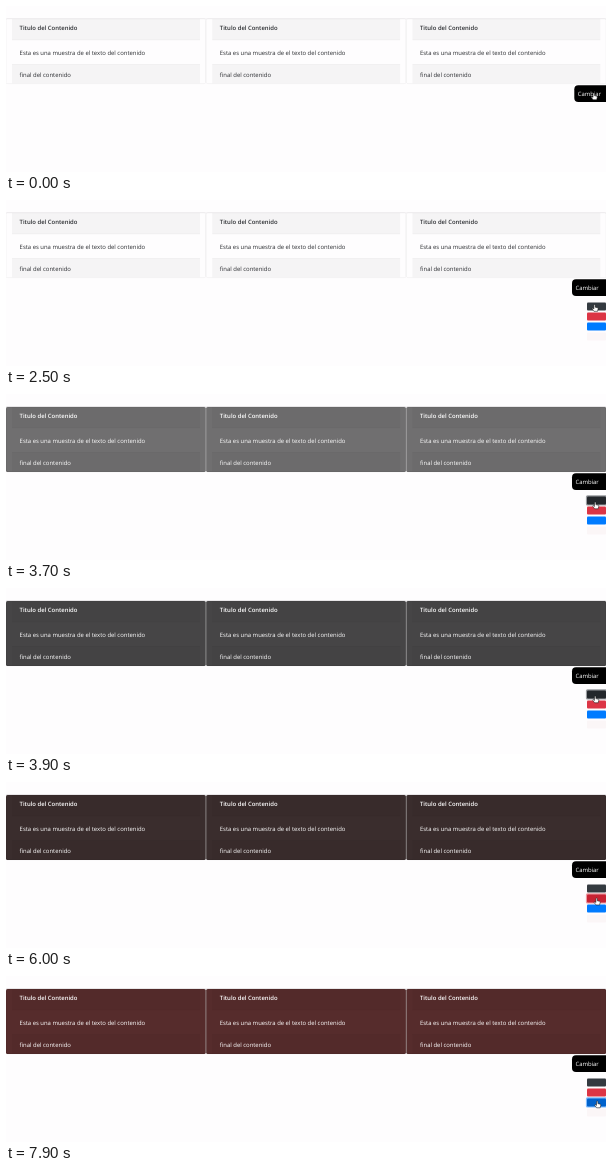
Recreate the animation shown at these times as an HTML page. Size 600x166 px, loop 8 s.

```html
<!DOCTYPE html>
<html lang="es">
<head>
<meta charset="utf-8">
<title>Cambiar</title>
<style>
  html, body { margin: 0; width: 100%; height: 100%; overflow: hidden; background: #fefdfe; }
  svg { display: block; width: 600px; height: 166px; }
  text { font: 5.93px "Open Sans", "Noto Sans", sans-serif; text-rendering: geometricPrecision; }
  .title { font-weight: 600; }
</style>
</head>
<body>
<svg id="stage" viewBox="0 0 600 166"></svg>
<script>
const LOOP = 8000;
const FADE = 1000;
const OPEN = 1350;
const stage = document.getElementById("stage");

function add(parent, tag, attrs, label) {
  const el = document.createElementNS("http://www.w3.org/2000/svg", tag);
  for (const key in attrs) el.setAttribute(key, attrs[key]);
  if (label) el.textContent = label;
  parent.appendChild(el);
  return el;
}

// The CSS "ease" curve, solved by bisection.
function ease(x) {
  if (x <= 0) return 0;
  if (x >= 1) return 1;
  const curve = (a, b, u) => 3 * a * u * (1 - u) ** 2 + 3 * b * u * u * (1 - u) + u ** 3;
  let lo = 0, hi = 1;
  for (let i = 0; i < 24; i++) {
    const mid = (lo + hi) / 2;
    if (curve(0.25, 0.25, mid) < x) lo = mid; else hi = mid;
  }
  return curve(0.1, 1, lo);
}

const mix = (a, b, k) => a.map((v, i) => v + (b[i] - v) * k);
const rgb = c => `rgb(${c.map(Math.round).join()})`;

// Cards
const cards = add(stage, "g", {});
const fills = [], edges = [];
add(cards, "rect", { x: 0, y: 12.5, width: 600, height: 0.7, fill: "#eeeaed" });
for (let i = 0; i < 3; i++) {
  const g = add(cards, "g", { transform: `translate(${i * 200.2})` });
  fills.push(add(g, "rect", { x: 0, y: 13, width: 199.7, height: 65, rx: 1.5 }));
  for (const [y, h] of [[13, 21], [58.3, 19]])
    add(g, "rect", { x: 6, y, width: 188, height: h, fill: "#000", "fill-opacity": 0.035 });
  for (const y of [33.7, 58])
    add(g, "rect", { x: 6, y, width: 188, height: 0.5, fill: "#000", "fill-opacity": 0.06 });
  edges.push(add(g, "rect", {
    x: 0, y: 12.9, width: 199.7, height: 64.8, rx: 1.5,
    fill: "none", stroke: "#000", "stroke-width": 0.6
  }));
  add(g, "text", { x: 13.6, y: 24.1, class: "title" }, "Titulo del Contenido");
  add(g, "text", { x: 13.6, y: 48.6 }, "Esta es una muestra de el texto del contenido");
  add(g, "text", { x: 13.6, y: 70.9 }, "final del contenido");
}

// Sliding button and colour panel
const tab = add(stage, "g", {});
add(tab, "rect", { x: 566, y: 79.3, width: 44, height: 16.7, rx: 4, fill: "#000" });
add(tab, "text", { x: 569.4, y: 89.9, fill: "#fff" }, "Cambiar");

const panel = add(stage, "g", {});
const buttons = [
  { color: "#343a40", active: "#23272b", ring: "#343a40", hover: [2100, 4150], focus: [3250, 5700] },
  { color: "#dc3545", active: "#c82333", ring: "#dc3545", hover: [4150, 6700], focus: [5700, 7500] },
  { color: "#007bff", active: "#0062cc", ring: "#007bff", hover: [6700, 8000], focus: [7500, 8000] },
  { color: "#fbf6f7" }
];
buttons.forEach((b, i) => {
  const box = { x: 581, y: 102.4 + i * 10, width: 19, height: 8, rx: 1 };
  b.halo = add(panel, "rect", {
    x: box.x - 1.1, y: box.y - 1.1, width: 22, height: 10.2, rx: 1.6,
    fill: b.ring || "none", "fill-opacity": 0.5
  });
  b.face = add(panel, "rect", box);
});

// Pointing hand, fingertip at the origin
const hand = add(stage, "g", {});
add(hand, "path", {
  d: "M-.7 .4Q0-.5.7.4V2.6L3.1 3.2Q3.7 3.4 3.6 4.2L3 6.8H-.6L-2.5 4.2Q-2.4 3.2-1.4 3.8L-.7 4.4Z",
  fill: "#fff", stroke: "#111", "stroke-width": 0.55, "stroke-linejoin": "round"
});

const trail = [
  [0, 587.7, 87], [950, 587.7, 87], [1500, 588, 90], [2300, 588.5, 104.5],
  [2700, 588.6, 104.6], [3200, 589.2, 108], [3900, 589.2, 108], [4300, 589.8, 111.5],
  [5200, 590.2, 115], [5900, 590.6, 116], [6300, 590.6, 117], [7000, 591, 123.5],
  [7500, 591.2, 125], [8000, 591.2, 125]
];

function pointAt(t) {
  const n = trail.findIndex(p => p[0] > t);
  const a = trail[n - 1], b = trail[n];
  const k = (t - a[0]) / (b[0] - a[0]);
  return mix(a, b, k * k * (3 - 2 * k)).slice(1);
}

// Each theme starts its fade on a click.
const LIGHT = [254, 253, 254];
const themes = [[3300, [46, 45, 46]], [5800, [86, 44, 44]]];

function themeAt(t) {
  return themes.reduce((c, [start, next]) => mix(c, next, ease((t - start) / FADE)), LIGHT);
}

const during = (t, span) => span && t >= span[0] && t < span[1];

function draw(t) {
  const dark = t >= themes[0][0];
  const fill = rgb(themeAt(t));
  fills.forEach(el => el.setAttribute("fill", fill));
  edges.forEach(el => el.setAttribute("stroke-opacity", dark ? 0.16 : 0.07));
  cards.setAttribute("fill", dark ? "#fff" : "#2b2d31");

  const open = ease((t - OPEN) / 700);
  tab.setAttribute("transform", `translate(${2.3 * (1 - open)})`);
  panel.setAttribute("transform", `translate(${22 * (1 - open)})`);
  for (const b of buttons) {
    const focus = during(t, b.focus);
    const lit = focus && during(t, b.hover) || during(t, b.hover) && t > 2900;
    b.face.setAttribute("fill", lit || focus ? b.active : b.color);
    b.halo.setAttribute("visibility", focus ? "visible" : "hidden");
  }
  hand.setAttribute("transform", `translate(${pointAt(t)})`);
}

const begin = performance.now();
function tick() {
  draw((performance.now() - begin) % LOOP);
  requestAnimationFrame(tick);
}
tick();
</script>
</body>
</html>
```
